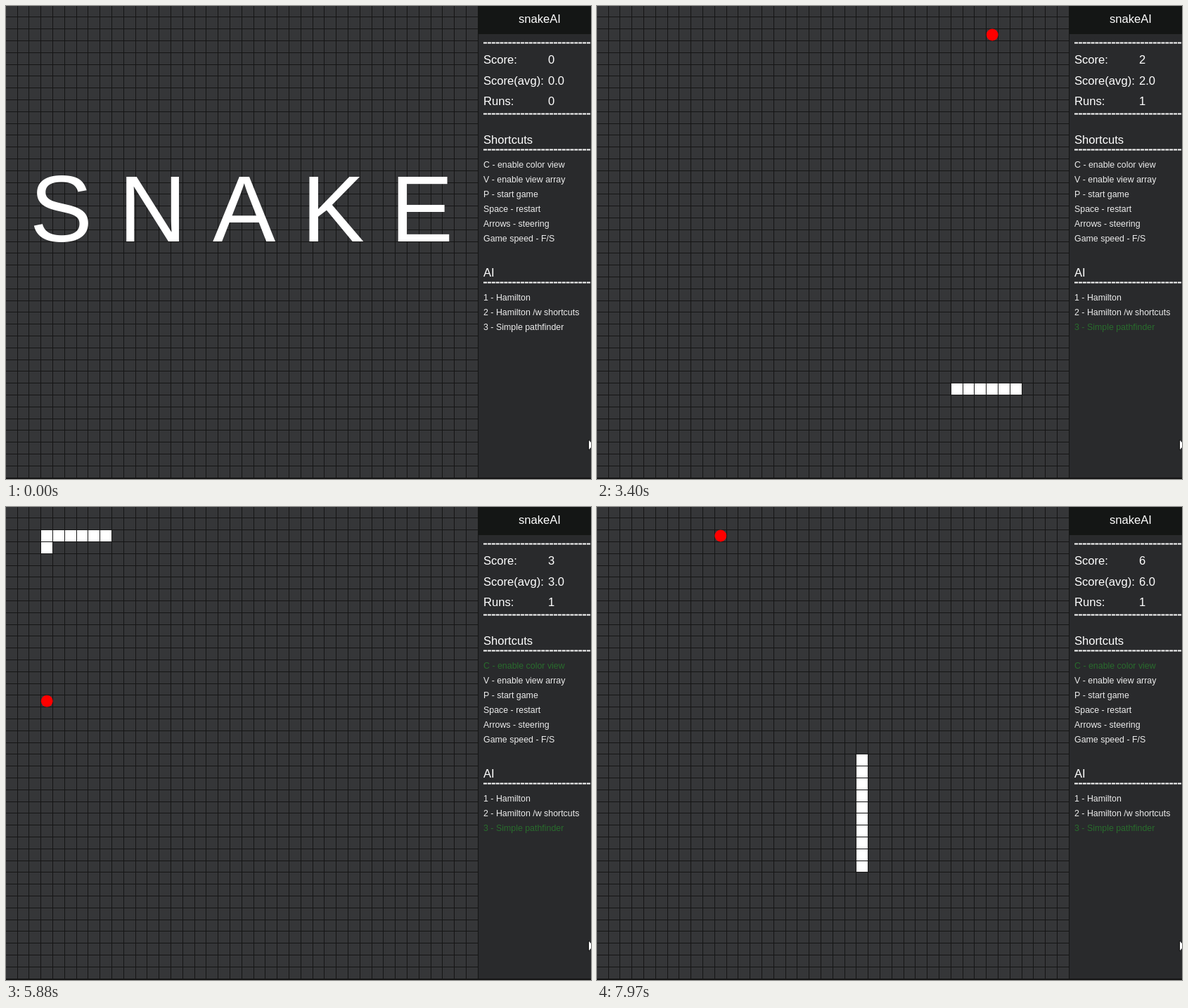
Animation of 832 by 673 pixels, one loop 8 s. Source, as an HTML page with a canvas:

```html
<!DOCTYPE html>
<html lang="en">
<head>
<meta charset="utf-8">
<title>snakeAI</title>
<style>
  html, body { margin: 0; width: 100%; height: 100%; overflow: hidden; background: #292a2c; }
  canvas { display: block; }
</style>
</head>
<body>
<canvas id="stage" width="832" height="673"></canvas>
<script>
const ctx = document.getElementById('stage').getContext('2d');
const LOOP = 8000, START = 980, TICK = 77.67, CELL = 16.8, COUNT = 40;
const WHITE = '#fff', GREEN = '#296c2d';
const FONT = '"Liberation Sans", Arial, sans-serif';

// Corners of the snake's route, in cells.
const ROUTE = [[1, 0], [19, 0], [19, 32], [39, 32], [39, 2], [3, 2], [3, 36], [22, 36], [22, 2]];

// [tick, cells travelled]
const PACE = [[0, 0], [10, 21], [14, 29], [31, 66], [32, 68], [43, 91], [54, 118], [55, 120],
  [65, 141], [72, 156], [82, 177], [87, 194], [90, 204]];

// Each piece of food and the travelled distance at which it is eaten.
const FOOD = [
  { cell: [19, 25], at: 43 },
  { cell: [34, 32], at: 65 },
  { cell: [33, 2], at: 106 },
  { cell: [3, 16], at: 150 },
  { cell: [4, 36], at: 171 },
  { cell: [22, 33], at: 192 },
  { cell: [10, 2], at: Infinity }
];

// With color view on, the body behind the head is repainted at these distances.
const COLOR_VIEW_AT = 91;
const PAINT = [[91, '#e08e50'], [106, '#7d9a4a'], [150, '#318a86'], [171, '#a06aa8'], [192, '#c9a545']];

const lineX = i => Math.floor(i * CELL - 0.7);
const lineY = i => Math.floor(i * CELL - 1);

function travelled(tick) {
  const i = Math.max(1, PACE.findIndex(p => p[0] >= tick));
  const [t0, d0] = PACE[i - 1], [t1, d1] = PACE[i];
  return Math.round(d0 + (d1 - d0) * (tick - t0) / (t1 - t0));
}

function cellAt(distance) {
  for (let i = 1; i < ROUTE.length; i++) {
    const [x0, y0] = ROUTE[i - 1], [x1, y1] = ROUTE[i];
    const length = Math.abs(x1 - x0) + Math.abs(y1 - y0);
    if (distance <= length) {
      return [x0 + Math.sign(x1 - x0) * distance, y0 + Math.sign(y1 - y0) * distance];
    }
    distance -= length;
  }
}

function rect(x, y, w, h, color) {
  ctx.fillStyle = color;
  ctx.fillRect(x, y, w, h);
}

function text(string, x, y, size = 16.6, color = WHITE, align = 'left') {
  ctx.font = `${size}px ${FONT}`;
  ctx.textAlign = align;
  ctx.fillStyle = color;
  ctx.fillText(string, x, y);
}

function list(items, y, active) {
  items.forEach((item, i) => text(item, 679, y + i * 21, 12.4, i === active ? GREEN : '#ececec'));
}

function rule(y) {
  ctx.strokeStyle = WHITE;
  ctx.lineWidth = 2;
  ctx.setLineDash([5, 0.88]);
  ctx.beginPath();
  ctx.moveTo(679, y);
  ctx.lineTo(831, y);
  ctx.stroke();
}

function drawBoard() {
  rect(0, 0, 672, 673, '#353638');
  for (let i = 1; i <= COUNT; i++) {
    rect(lineX(i), 0, 1, 672, '#151515');
    rect(0, lineY(i), 672, 1, '#151515');
  }
}

function drawSnake(distance, score) {
  const paint = PAINT.filter(p => p[0] <= distance).pop();
  for (let d = Math.max(0, distance - 3 - score); d <= distance; d++) {
    const [col, row] = cellAt(d);
    const x = lineX(col) + 1, y = lineY(row) + 1;
    rect(x, y, lineX(col + 1) - x, lineY(row + 1) - y, paint && d < paint[0] ? paint[1] : WHITE);
  }
}

function drawFood([col, row]) {
  ctx.fillStyle = '#f00';
  ctx.beginPath();
  ctx.arc((col + 0.5) * CELL - 0.6, (row + 0.5) * CELL - 1, 8.4, 0, 2 * Math.PI);
  ctx.fill();
}

function drawSidebar(running, score, colorView) {
  rect(672, 0, 160, 673, '#292a2c');
  rect(671, 0, 161, 40, '#141615');
  rect(0, 671, 832, 2, '#151515');
  text('snakeAI', 759, 24, 16.6, WHITE, 'center');
  [52.5, 153.5, 204.5, 393.5].forEach(rule);
  [['Score:', score], ['Score(avg):', score.toFixed(1)], ['Runs:', running ? 1 : 0]].forEach(([label, value], i) => {
    const y = 82 + Math.round(i * 29.5);
    text(label, 679, y);
    text(value, 771, y);
  });
  text('Shortcuts', 679, 196);
  list(['C - enable color view', 'V - enable view array', 'P - start game', 'Space - restart',
    'Arrows - steering', 'Game speed - F/S'], 230, colorView ? 0 : -1);
  text('AI', 679, 385);
  list(['1 - Hamilton', '2 - Hamilton /w shortcuts', '3 - Simple pathfinder'], 419, running ? 2 : -1);

  // Mouse pointer at the right edge
  rect(828, 617, 1, 15, '#111');
  ctx.fillStyle = WHITE;
  ctx.beginPath();
  ctx.moveTo(829, 618);
  ctx.lineTo(833, 622);
  ctx.lineTo(833, 627);
  ctx.lineTo(829, 631);
  ctx.fill();
}

function draw(time) {
  const running = time >= START;
  const tick = Math.min(90, Math.floor((time - START) / TICK + 0.1));
  const distance = running ? travelled(Math.max(0, tick)) : 0;
  const score = FOOD.filter(food => food.at <= distance).length;

  drawBoard();
  if (running) {
    drawFood(FOOD[score].cell);
    drawSnake(distance, score);
  } else {
    text('S N A K E', 33.8, 335, 133.8);
  }
  drawSidebar(running, score, distance >= COLOR_VIEW_AT);
}

const begin = performance.now();
function frame() {
  draw((performance.now() - begin) % LOOP);
  requestAnimationFrame(frame);
}
frame();
</script>
</body>
</html>
```
